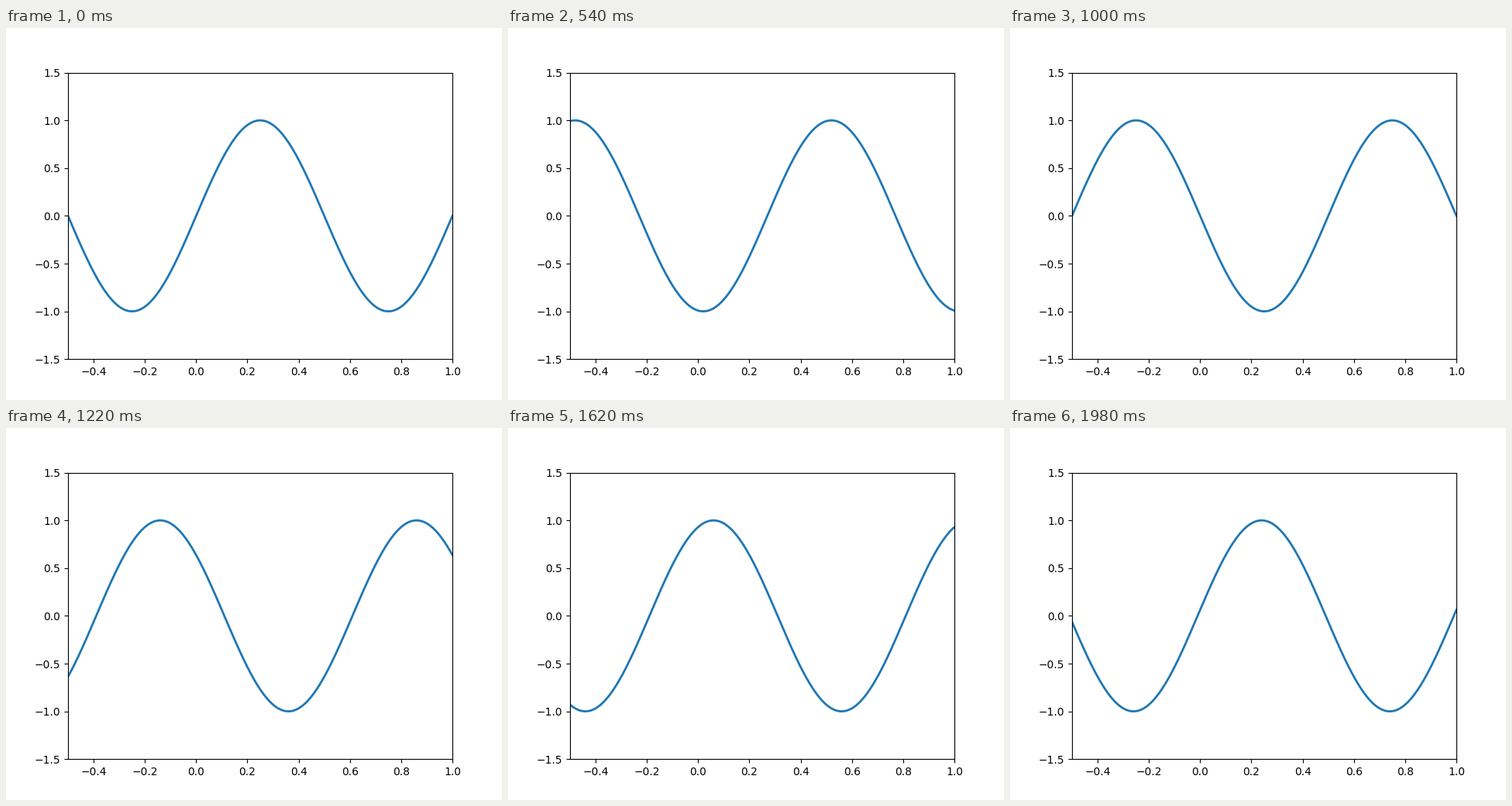
Animation of 640x480 px, one loop 2 s. Source, as a matplotlib script:

```python
import numpy as np
import matplotlib.pyplot as plt
from matplotlib.animation import FuncAnimation

FRAMES = 100
INTERVAL = 20  # ms

fig, ax = plt.subplots(figsize=(6.4, 4.8), dpi=100)
ax.set_xlim(-0.5, 1)
ax.set_ylim(-1.5, 1.5)

x = np.linspace(-0.5, 1, 1000)
line, = ax.plot(x, np.sin(2 * np.pi * x), color="#1f77b4", lw=2)


def update(i):
    """Shift the sine wave right, one full period per loop."""
    line.set_ydata(np.sin(2 * np.pi * (x - i / FRAMES)))
    return line,


anim = FuncAnimation(fig, update, frames=FRAMES, interval=INTERVAL,
                     repeat=True, repeat_delay=0)
plt.show()
```
